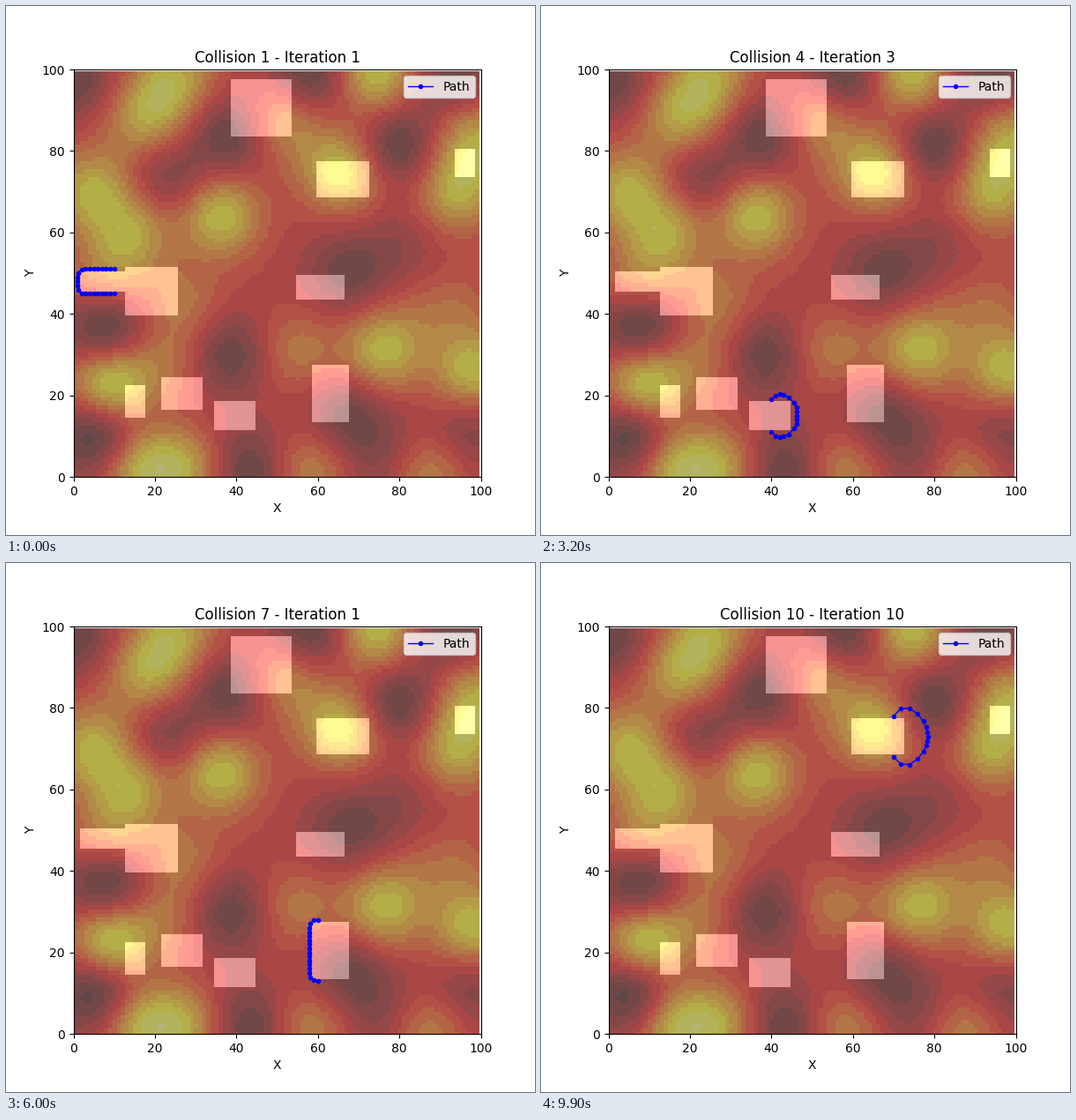
Write a matplotlib script that moves like this. It is 600 by 600 pixels and loops after 10000 ms.

```python
import numpy as np
import matplotlib.pyplot as plt
from matplotlib.animation import FuncAnimation

SIZE = 100
ITERATIONS = 10
STIFFNESS, TENSION, PUSH = 0.05, 0.25, 0.6

# Key points of the cost field, grouped by height
TERRAIN = {
    0.74: [(18, 89), (25, 98), (4, 70), (14, 60), (36, 64), (74, 99), (66, 75),
           (99, 82), (94, 70), (9, 23), (16, 2), (27, 2), (76, 31), (98, 26)],
    0.53: [(10, 81), (52, 88), (54, 78), (27, 43), (8, 48), (55, 31), (58, 2),
           (93, 41), (83, 40), (87, 1), (23, 29)],
    0.14: [(1, 97), (38, 84), (58, 98), (93, 99), (79, 81), (67, 50), (8, 36),
           (6, 10), (38, 30), (43, 2), (67, 15)],
    0.24: [(80, 56), (76, 5), (97, 11), (23, 73)],
}

# Blocked cells, inclusive: x0, y0, x1, y1
BLOCKS = np.array([
    (2, 46, 12, 50), (13, 40, 25, 51), (13, 15, 17, 22), (22, 17, 31, 24),
    (35, 12, 44, 18), (59, 14, 67, 27), (55, 44, 66, 49), (60, 69, 72, 77),
    (39, 84, 53, 97), (94, 74, 98, 80),
])


def cost_field(mean=0.35, reach=7):
    def kernel(a, b):
        d2 = ((a[:, None] - b[None]) ** 2).sum(-1)
        return np.exp(-d2 / (2 * reach ** 2))

    xy = np.array([p for points in TERRAIN.values() for p in points])
    rise = np.array([h - mean for h, points in TERRAIN.items() for _ in points])
    weights = np.linalg.solve(kernel(xy, xy) + 0.02 * np.eye(len(xy)), rise)
    gx, gy = np.meshgrid(np.arange(SIZE), np.arange(SIZE))
    cells = np.column_stack([gx.ravel(), gy.ravel()])
    field = mean + kernel(cells, xy) @ weights
    return np.clip(field, 0, 1).reshape(SIZE, SIZE)


def block_mask():
    mask = np.zeros((SIZE, SIZE))
    for x0, y0, x1, y1 in BLOCKS:
        mask[y0:y1 + 1, x0:x1 + 1] = 1
    return mask


def first_path(start, side, top, bottom):
    step = 1 if side > start else -1
    run = list(range(start, side, step))
    points = [(x, top) for x in run]
    points += [(side, y) for y in range(top - 1, bottom, -1)]
    points += [(x, bottom) for x in reversed(run)]
    return np.array(points, float)


def detours(mask):
    """Shortest free way round each block met by every tenth column."""
    for x in range(10, SIZE, 10):
        for x0, y0, x1, y1 in sorted(BLOCKS.tolist(), key=lambda b: b[1]):
            if x0 <= x <= x1:
                free = [s for s in (x0 - 1, x1 + 1)
                        if not mask[y0 - 1:y1 + 2, s].any()]
                side = min(free, key=lambda s: abs(s - x))
                yield first_path(x, side, y1 + 1, y0 - 1)


def away_from_blocks(path):
    near = np.clip(path[:, None], BLOCKS[None, :, :2], BLOCKS[None, :, 2:])
    gap = path[:, None] - near
    dist = np.linalg.norm(gap, axis=2)
    rows = np.arange(len(path))
    best = dist.argmin(1)
    return gap[rows, best] / np.maximum(dist[rows, best], 1e-6)[:, None]


def relax(path, push):
    bend = np.zeros_like(path)
    bend[1:-1] = np.diff(path, 2, axis=0)
    move = -STIFFNESS * np.diff(bend, 2, axis=0)
    if push:
        move += TENSION * bend[1:-1] + PUSH * away_from_blocks(path)[1:-1]
    new = path.copy()
    new[1:-1] = np.clip(path[1:-1] + move, 0.9, 99)
    return new


def build_paths(mask):
    paths = []
    for path in detours(mask):
        for i in range(ITERATIONS):
            path = relax(path, push=i > 0)
            paths.append(path)
    return paths


mask = block_mask()
paths = build_paths(mask)

fig, ax = plt.subplots(figsize=(6, 6), dpi=100)
ax.imshow(cost_field(), cmap=plt.get_cmap("hot", 16), vmin=0, vmax=1,
          alpha=0.6, origin="lower")
ax.imshow(mask, cmap="gray", vmin=0, vmax=1, alpha=0.3, origin="lower")
line, = ax.plot([], [], "bo-", markersize=3, linewidth=1, label="Path")
ax.set(xlim=(0, SIZE), ylim=(0, SIZE), xlabel="X", ylabel="Y")
ax.legend(loc="upper right")
title = ax.set_title("")


def update(frame):
    collision, iteration = divmod(frame, ITERATIONS)
    line.set_data(*paths[frame].T)
    title.set_text(f"Collision {collision + 1} - Iteration {iteration + 1}")
    return line, title


anim = FuncAnimation(fig, update, frames=len(paths), interval=100,
                     repeat=True, repeat_delay=0, blit=False)
plt.show()
```
